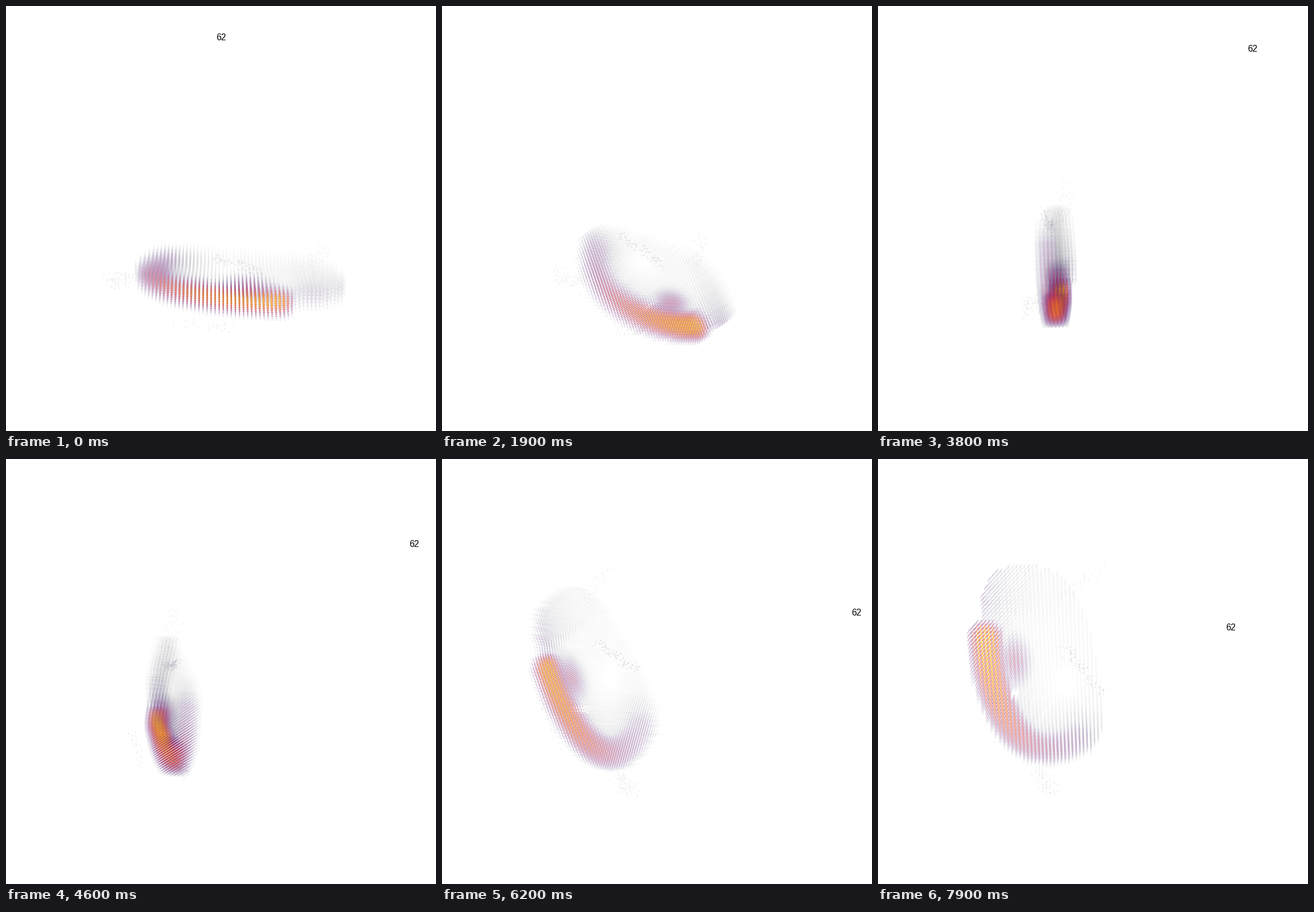
Recreate the animation shown at these times as a matplotlib script. Size 753 by 744 pixels, loop 8 s.

```python
import numpy as np
import matplotlib.pyplot as plt
from matplotlib.animation import FuncAnimation

W, H, DPI = 753, 744, 64
PT = 72 / DPI                              # points per pixel
FRAMES, INTERVAL = 80, 100
STEP = 6.4                                 # voxel spacing in pixels
EYE = H / 2 / np.tan(np.radians(15))       # 30 degree field of view
TILT = np.radians(70)
LABEL = np.array([[0, 277, 277]])
BAND = 31                                  # half width of the bright band

rng = np.random.default_rng(62)


def bezier(t, a, b, c, d):
    a, b, c, d = map(np.array, (a, b, c, d))
    t = t[:, None]
    s = 1 - t
    return s**3 * a + 3 * s**2 * t * b + 3 * s * t**2 * c + t**3 * d


def ridge(p):
    """Distance to the J-shaped spine and the peak value at the nearest place."""
    t = np.linspace(0, 1, 150)
    spine = bezier(t, (88, -170), (-10, -174), (-168, -138), (-95, -25))
    dist = np.linalg.norm(p[:, None] - spine, axis=2)
    return dist.min(axis=1), .87 - .6 * t[dist.argmin(axis=1)] ** 1.6


def bump(x, y, cx, cy, rx, ry):
    return np.exp(-((x - cx) / rx) ** 2 - ((y - cy) / ry) ** 2)


def body():
    """Voxels of the slab with their values."""
    gx = 112.3 + STEP * np.arange(-44, 15)
    gy = -203 + STEP * np.arange(38)
    p = np.array(np.meshgrid(gx, gy)).reshape(2, -1).T
    dist, peak = ridge(p)
    u = (p[:, 0] - 38) / 165
    w = (p[:, 1] + 78 + 25 * u) / 88
    inside = (dist < BAND) | (abs(u) ** 3 + abs(w) ** 3 < 1)
    p, dist, peak = p[inside], dist[inside], peak[inside]
    x, y = p.T
    upper = 1 / (1 + np.exp((122 - x) / 5))

    core = peak * np.clip(1 - (dist / (BAND + 2)) ** 2.6, 0, 1)
    shelf = .5 * bump(x, y, 45, -126, 40, 23)
    glow = .15 * np.exp(-(dist / 45) ** 2)
    rim = .24 * np.exp(-np.clip(y + 175, 0, None) / 42)
    haze = .035 + glow * (1 - upper) + rim * upper
    haze *= (1 - .95 * bump(x, y, 8, -45, 30, 24)) * rng.uniform(.7, 1.1, len(p))
    v = np.maximum.reduce([core, shelf, haze])
    v[np.hypot(x + 14, y + 130) < 8] = 0

    k = STEP * np.arange(-3, 4)
    mid = -74 - .045 * x + 8 * upper
    z = mid[:, None] + k
    v = v[:, None] * (1 - (k / 24) ** 2)
    x, y, _ = np.broadcast_arrays(x[:, None], y[:, None], z)
    keep = v > .012
    return np.column_stack([x[keep], y[keep], z[keep]]), v[keep]


def specks(a, b, n, spread, value):
    """Faint stray voxels scattered along a segment."""
    a, b = np.array(a), np.array(b)
    p = a + rng.random((n, 1)) * (b - a) + rng.normal(0, spread, (n, 3))
    p = np.unique(np.round(p / STEP), axis=0) * STEP
    return p, value * rng.uniform(.5, 1.2, len(p))


parts = [
    body(),
    specks((-155, -98, -78), (-195, -70, -80), 100, 7, .07),
    specks((-85, -158, -122), (20, -155, -132), 36, 3, .08),
    specks((72, -42, -82), (-12, 14, -82), 65, 4, .15),
    specks((150, -45, -69), (195, 20, -64), 75, 8, .05),
]
POINTS, VALUE = (np.concatenate(c) for c in zip(*parts))
COLORS = plt.get_cmap("inferno")(VALUE)
COLORS[:, 3] = .85 * VALUE ** 1.1


def project(p, i):
    """Spin about (1, 1, 1), tilt, then apply perspective."""
    t = np.radians(3 * i)
    a = (1 + 2 * np.cos(t)) / 3
    b = (1 - np.cos(t)) / 3 + np.sin(t) / np.sqrt(3)
    c = (1 - np.cos(t)) / 3 - np.sin(t) / np.sqrt(3)
    x, y, z = np.array([[a, c, b], [b, a, c], [c, b, a]]) @ p.T
    up = y * np.cos(TILT) + z * np.sin(TILT)
    depth = z * np.cos(TILT) - y * np.sin(TILT)
    s = EYE / (EYE - depth)
    return np.column_stack([W / 2 + x * s, H / 2 - up * s]), depth


fig = plt.figure(figsize=(W / DPI, H / DPI), dpi=DPI, facecolor="white")
ax = fig.add_axes([0, 0, 1, 1])
ax.set(xlim=(0, W), ylim=(H, 0))
ax.axis("off")
cloud = ax.scatter(POINTS[:, 0], POINTS[:, 1], s=(3.1 * PT) ** 2,
                   c=COLORS, marker=(6, 0, 0), linewidths=0)
label = ax.text(0, 0, "62", family="Liberation Sans", fontsize=15.5 * PT,
                color="black", ha="center", va="baseline")


def draw(i):
    xy, depth = project(POINTS, i)
    order = np.argsort(depth)
    cloud.set_offsets(xy[order])
    cloud.set_facecolors(COLORS[order])
    (x, y), = project(LABEL, i)[0]
    label.set_position((x, y + 5.5))
    label.set_visible(y > 2)    # dropped whole once its anchor leaves the stage
    return cloud, label


anim = FuncAnimation(fig, draw, frames=FRAMES, interval=INTERVAL,
                     repeat=True, repeat_delay=0, blit=False)
plt.show()
```
